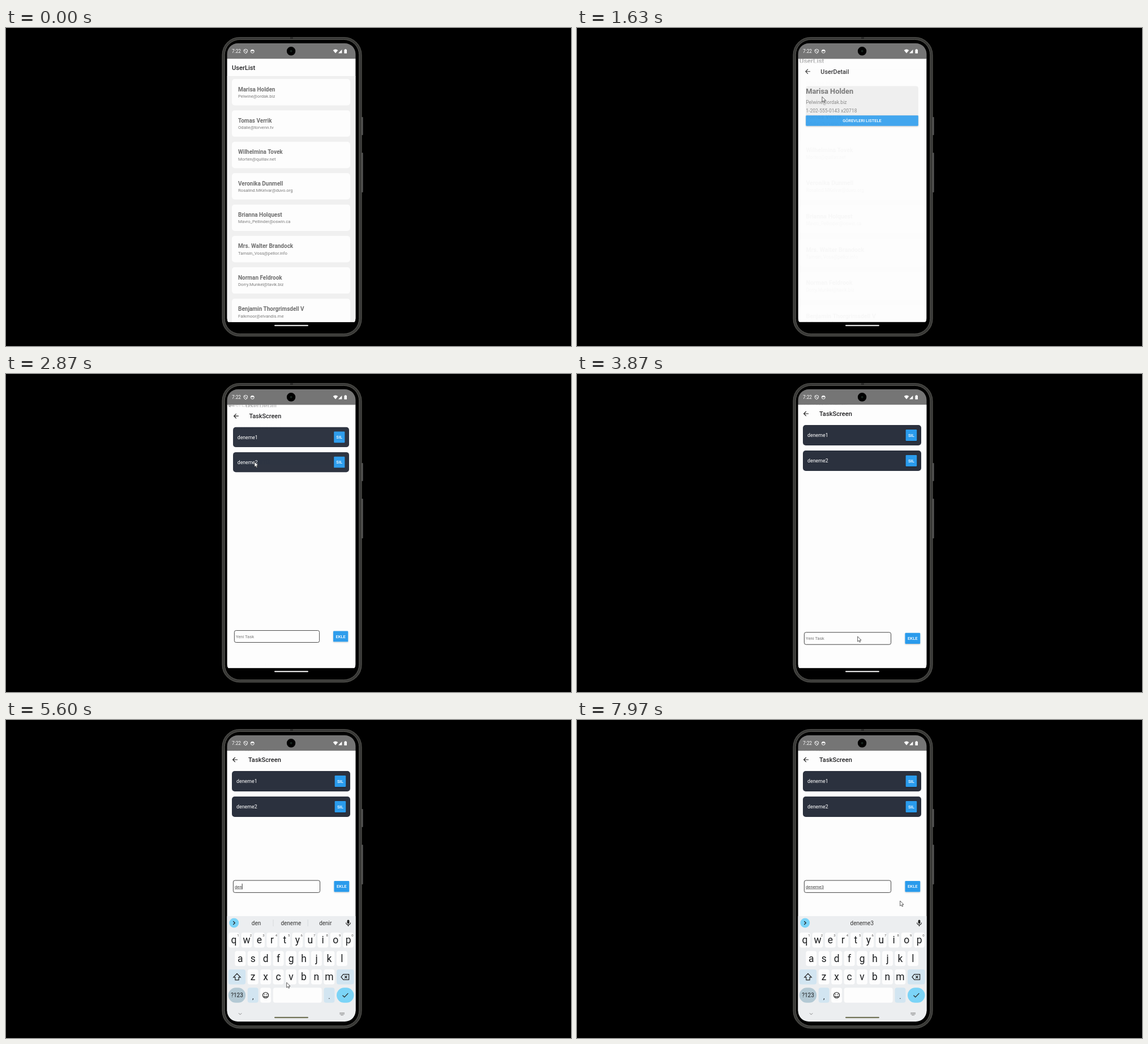
An HTML page that plays this animation: 998x561 px, repeating every 8 s.

```html
<!DOCTYPE html>
<html lang="tr">
<head>
<meta charset="utf-8">
<title>User tasks</title>
<style>
html, body { margin: 0; width: 100%; height: 100%; overflow: hidden; background: #000; }
svg { display: block; width: 100vw; height: 100vh; font-family: Roboto, sans-serif; }
.title { font-size: 11.15px; font-weight: 500; fill: #222224; }
.name { font-size: 10px; font-weight: 700; fill: #6e6e6e; }
.mail { font-size: 7.73px; fill: #7c7c7c; }
.big { font-size: 13.25px; font-weight: 700; fill: #6a6a6a; }
.info { font-size: 8.83px; fill: #7c7c7c; }
.task { font-size: 8.83px; fill: #fff; }
.btn { font-size: 7.73px; font-weight: 500; fill: #fff; text-anchor: middle; }
.key { font-size: 17.5px; fill: #1b1d1f; text-anchor: middle; }
.digit { font-size: 6px; fill: #555; text-anchor: middle; }
.word { font-size: 10px; fill: #333; text-anchor: middle; }
.line { fill: none; stroke: #222; stroke-width: 1.2; }
</style>
</head>
<body>
<svg viewBox="0 0 998 561" preserveAspectRatio="none">
  <defs>
    <clipPath id="display"><rect x="390.5" y="27" width="227" height="505" rx="19"/></clipPath>
    <clipPath id="app"><path d="M390.5 54.5H617.5V512Q617.5 516 615.5 518.5H392.5Q390.5 516 390.5 512Z"/></clipPath>
    <filter id="lift" x="-20%" y="-20%" width="140%" height="160%">
      <feDropShadow dx="0" dy="1" stdDeviation="0.9" flood-opacity=".25"/>
    </filter>
  </defs>
  <rect width="998" height="561"/>
  <g id="body"></g>
  <g clip-path="url(#display)">
    <rect x="390" y="27" width="228" height="28" fill="#757575"/>
    <g clip-path="url(#app)">
      <rect x="390" y="54" width="228" height="465" fill="#fdfdfd"/>
      <g id="list"></g>
      <g id="detail"></g>
      <g id="tasks"></g>
    </g>
    <g id="keyboard"></g>
    <rect id="home" x="474" y="523.7" width="60" height="2.2" rx="1.1"/>
  </g>
  <g id="status"></g>
  <path id="cursor" d="M0 0V9L2.1 7.2 3.5 10.2 5 9.5 3.7 6.6H6.3Z" fill="#fff" stroke="#333" stroke-width=".8"/>
</svg>
<script>
const LOOP = 8000;
const $ = id => document.getElementById(id);
const text = (cls, x, y, s, extra = '') => `<text class="${cls}" x="${x}" y="${y}" ${extra}>${s}</text>`;
const box = (x, y, w, h, r, fill, extra = '') =>
  `<rect x="${x}" y="${y}" width="${w}" height="${h}" rx="${r}" fill="${fill}" ${extra}/>`;
const line = (d, extra = '') => `<path class="line" d="${d}" ${extra}/>`;
const button = (x, y, w, h, label) =>
  box(x, y, w, h, 1.2, '#2b9bec', 'filter="url(#lift)"') + text('btn', x + w / 2, y + h / 2 + 2.8, label);
const page = (title, back) => box(390, 54, 228, 478, 0, '#fdfdfd') +
  (back ? line('M409 70H400.8M404.8 65.8L400.6 70L404.8 74.2') : '') +
  text('title', back ? 428 : 399, 74.3, title);

const users = [
  ['Marisa Holden', 'Pelwine@ordak.biz'],
  ['Tomas Verrik', 'Odalie@torvenn.tv'],
  ['Wilhelmina Tovek', 'Morten@quillav.net'],
  ['Veronika Dunmell', 'Rosalind.MKelvar@duvo.org'],
  ['Brianna Holquest', 'Mavro_Pellinder@oswin.ca'],
  ['Mrs. Walter Brandock', 'Tamsin_Voss@pellor.info'],
  ['Norman Feldrook', 'Dorry.Munkel@tavik.biz'],
  ['Benjamin Thorgrimsdell V', 'Falkmoor@elvandis.me']
];

$('body').innerHTML =
  box(628, 157, 2.6, 32, 1, '#555') + box(628, 220, 2.6, 70, 1, '#555') +
  box(382, 16.5, 246, 527.2, 31, '#383836', 'stroke="#50504c" stroke-width="1.2"') +
  box(386.2, 20.4, 237.6, 519.2, 27, '#000', 'stroke="#5a5a55" stroke-width="1"') +
  box(502, 16.5, 5, 2.5, 0, '#222');

$('status').innerHTML =
  text('', 399, 44.2, '7:22', 'font-size="8.3" fill="#fff"') +
  `<g fill="none" stroke="#fff" stroke-width="1">
    <path d="M423.3 37.4L426.4 38.6V41Q426.2 43.6 423.3 44.8Q420.4 43.6 420.2 41V38.6ZM421 38.5L425.6 43.4"/>
    <circle cx="435.3" cy="41.2" r="3"/><path d="M432.6 40H438" stroke-width="1.7"/></g>
  <g fill="#fff"><path d="M577.7 39.3Q582 35.9 586.3 39.3L582 44.6Z"/><path d="M587 44.5L593.4 38V44.5Z"/>
    <path d="M597.4 38.2H598.6V37.2H600.8V38.2H602V44.7H597.4Z"/></g>
  <circle cx="503.6" cy="40.8" r="7.7"/><circle cx="503.6" cy="40.8" r="2" fill="#17231d"/>`;

$('list').innerHTML = page('UserList') + box(390, 85, 228, 447, 0, '#f0f0f0') +
  box(390, 85, 228, 1, 0, '#ebebeb') +
  users.map(([name, mail], i) => `<g transform="translate(0 ${i * 55.35})">` +
    box(399, 90, 209, 46.5, 5, '#fdfdfd') + text('name', 410, 111.7, name) +
    text('mail', 410, 123.1, mail) + '</g>').join('');
const firstCard = $('list').querySelector('g');

$('detail').innerHTML = page('UserDetail', true) + box(401, 96.7, 205, 72, 4, '#ededed') +
  text('big', 401, 110.8, users[0][0]) + text('info', 401, 129.6, users[0][1]) +
  text('info', 401, 144.2, '1-202-555-0143 x20718') +
  button(401, 150, 205, 19, 'GÖREVLERI LISTELE');

$('tasks').innerHTML = page('TaskScreen', true) +
  [90, 135].map((y, i) => box(399, y, 209, 36, 5, '#2b313e') +
    text('task', 407, y + 21.2, 'deneme' + (i + 1)) + button(580.7, y + 8, 19.5, 20, 'SIL')).join('') +
  `<g id="form">${box(401.4, 283, 153.2, 21.4, 3, '#fdfdfd', 'stroke="#444" stroke-width="1"')}` +
  text('mail', 404, 296.5, '', 'id="entry"') + box(404, 297.7, 0, 0.7, 0, '#444', 'id="under"') +
  box(404, 288.7, 0.9, 10, 0, '#222', 'id="caret"') + button(579.5, 284, 26.7, 19.2, 'EKLE') + '</g>';

function keyRow(letters, x0, top) {
  return [...letters].map((c, i) => {
    const x = x0 + i * 22.45;
    return box(x - 9.5, top, 19, 26.5, 4, '#fdfdfd') +
      text('key', x, top + 19.2, c, 'data-key') +
      (letters.length === 10 ? text('digit', x + 7.4, top + 6.8, (i + 1) % 10) : '');
  }).join('');
}
const mic = '<rect x="602.6" y="352.6" width="3.8" height="6.8" rx="1.9" fill="#222"/>' +
  line('M600.6 357.5A3.9 3.9 0 0 0 608.4 357.5M604.5 361.5V364');
const tools =
  line('M404.3 355L401.2 358L404.3 361') +
  line('M430.5 353.5H439.7V359.5L436.5 362.7H430.5ZM436.5 362.5V359.5H439.5M432.7 358.7Q434.5 361 436.4 358.7M433 356V357M437 356V357') +
  text('btn', 467.3, 360.8, 'GIF', 'style="fill:#222;font-weight:900"') +
  line('M496 354H503.8V363H496ZM498 353.4H501.8V355.4H498ZM497.6 358H502M497.6 360.5H501') +
  '<circle cx="532.2" cy="358" r="3.1" class="line" style="stroke-width:2.2"/>' +
  '<circle cx="532.2" cy="358" r="4.6" class="line" stroke-dasharray="1.8 1.81"/>' +
  box(552, 352, 0.7, 12, 0, '#ccd0d4') +
  [568.2, 572, 575.8].map(x => `<circle cx="${x}" cy="358" r="1.1" fill="#222"/>`).join('');

$('keyboard').innerHTML = box(390, 346, 228, 190, 0, '#eceef0') +
  '<circle cx="402.8" cy="358" r="8.4" fill="#7bd4f7"/>' +
  `<g id="tools">${tools}</g><g id="words"></g>${mic}` +
  keyRow('QWERTYUIOP', 402.6, 375) + keyRow('ASDFGHJKL', 413.8, 407.4) + keyRow('ZXCVBNM', 436.2, 440) +
  box(392.7, 440, 30.5, 26.5, 4, '#d2e5f1') + box(584, 440, 30.5, 26.5, 4, '#d2e5f1') +
  line('M408 447.4L401.8 453.8H404.9V458.7H411.1V453.8H414.2Z', 'id="shift"') +
  line('M592 453.4L595.8 448.6H605.6V458.2H595.8ZM598.2 451.2L602.6 455.6M602.6 451.2L598.2 455.6') +
  box(392.7, 472.3, 30.5, 26.5, 13.2, '#b3c9d4') +
  text('word', 408, 489.3, '?123', 'style="fill:#1b1d1f"') +
  [[426.7, ',', '#d2e5f1'], [449.1, '', '#fdfdfd'], [561.5, '.', '#d2e5f1']].map(([x, c, fill]) =>
    box(x, 472.3, 19, 26.5, 4, fill) + text('key', x + 9.5, 492, c, 'style="font-size:13px"')).join('') +
  '<circle cx="458.6" cy="485.5" r="5" class="line"/>' +
  line('M455.8 487Q458.6 490 461.4 487M456.8 483.2V484.8M460.4 483.2V484.8') +
  box(471.8, 472.3, 86, 26.5, 4, '#fdfdfd') + box(584, 472.3, 30.5, 26.5, 13.2, '#7bd4f7') +
  line('M594.5 485.7L597.8 488.9L604.3 482.2') +
  line('M411 517.2L413.6 519.8L416.2 517.2', 'style="stroke:#777;stroke-width:.9"') +
  line('M589.5 516.6H597.8M589.5 518.6H597.8M591.5 520.7H595.8', 'stroke-dasharray="1.2 .6" style="stroke:#777"');

const clamp = v => Math.min(1, Math.max(0, v));
const span = (t, from, to) => clamp((t - from) / (to - from));
const mix = (a, b, p) => a + (b - a) * p;

// Cubic bezier (.35,.45)-(0,1): the screen zoom easing.
function zoomEase(x) {
  let lo = 0, hi = 1;
  for (let i = 0; i < 24; i++) {
    const m = (lo + hi) / 2;
    if (1.05 * m * (1 - m) ** 2 + m ** 3 < x) lo = m; else hi = m;
  }
  return 1.35 * lo * (1 - lo) ** 2 + 3 * lo * lo * (1 - lo) + lo ** 3;
}

function place(el, enter, leave) {
  const scale = mix(0.85, 1, enter) * mix(1, 1.075, leave);
  el.setAttribute('transform', `translate(504 286) scale(${scale}) translate(-504 -286)`);
  el.setAttribute('opacity', clamp(enter * 1.12) * (1 - 0.8 * leave));
  el.setAttribute('display', enter > 0 && leave < 1 ? 'inline' : 'none');
}

// time, x, y of the pointer tip
const path = [
  [560, 628, 300], [820, 520, 190], [1120, 433, 121.3], [1950, 433, 121.3], [2200, 439, 155],
  [3220, 439, 155], [3370, 463, 132], [3500, 579, 89], [3600, 576, 150], [3870, 495.7, 463],
  [7420, 495.7, 463], [7900, 570.7, 319]
];
function moveCursor(t) {
  const i = path.findLastIndex(p => p[0] <= t);
  $('cursor').setAttribute('display', i < 0 ? 'none' : 'inline');
  if (i < 0) return;
  const a = path[i], b = path[i + 1] || a;
  let p = a === b ? 0 : span(t, a[0], b[0]);
  p = p * p * (3 - 2 * p);
  $('cursor').setAttribute('transform', `translate(${mix(a[1], b[1], p)} ${mix(a[2], b[2], p)})`);
}

const typed = 'deneme3';
const strokes = [5000, 5200, 5420, 5620, 5840, 6040, 6450];
const hints = [[], ['da', 'de', 'daha'], ['de', 'değil', 'deneme'], ['den', 'deneme', 'denir']];
const common = ['deneme', 'deneme2', 'deneme1'];
let shown = null;

function showTyping(count, words) {
  const state = count + words.join();
  if (state === shown) return;
  shown = state;
  const entry = $('entry');
  entry.textContent = count ? typed.slice(0, count) : 'Yeni Task';
  entry.style.fill = count ? '#444' : '#777';
  const width = count ? entry.getComputedTextLength() : 0;
  $('under').setAttribute('width', width);
  $('caret').setAttribute('x', 404 + width);
  $('tools').setAttribute('display', count ? 'none' : 'inline');
  const xs = words.length === 1 ? [503.3] : [442, 503.3, 564.3];
  $('words').innerHTML = !count ? '' : line('M401.3 355L404.4 358L401.3 361') +
    words.map((w, i) => text('word', xs[i], 362, w) +
      (i ? box((xs[i - 1] + xs[i]) / 2 - 1, 352, 0.7, 12, 0, '#ccd0d4') : '')).join('');
  document.querySelectorAll('[data-key]').forEach(k => {
    k.textContent = count ? k.textContent.toLowerCase() : k.textContent.toUpperCase();
  });
  $('shift').style.fill = count ? 'none' : '#111';
}

function render(t) {
  const toDetail = zoomEase(span(t, 1500, 1900));
  const toTasks = zoomEase(span(t, 2706, 3106));
  place($('list'), 1, toDetail);
  place($('detail'), toDetail, toTasks);
  place($('tasks'), toTasks, 0);
  firstCard.setAttribute('opacity', mix(1, 0.2, span(t, 1260, 1410)));

  const focus = 4000;
  const rise = 1 - (1 - span(t, 4180, 4480)) ** 3;
  $('keyboard').setAttribute('transform', `translate(0 ${(1 - rise) * 190})`);
  $('keyboard').setAttribute('display', rise > 0 ? 'inline' : 'none');
  $('form').setAttribute('transform', `translate(0 ${t < 4250 ? 172.8 : 0})`);
  const tone = span(t, 4500, 4850);
  $('home').setAttribute('fill', rise < 0.2 ? '#e0e0e0'
    : `rgb(${mix(190, 114, tone)},${mix(190, 116, tone)},${mix(190, 88, tone)})`);

  const count = strokes.filter(s => s <= t).length;
  showTyping(count, t >= 6900 ? [typed] : hints[count] || common);
  const since = t - (count ? strokes[count - 1] : focus);
  $('caret').setAttribute('display', since >= 0 && since % 1000 < 500 ? 'inline' : 'none');
  moveCursor(t);
}

const start = performance.now();
function tick() {
  render((performance.now() - start) % LOOP);
  requestAnimationFrame(tick);
}
render(0);
requestAnimationFrame(tick);
</script>
</body>
</html>
```
